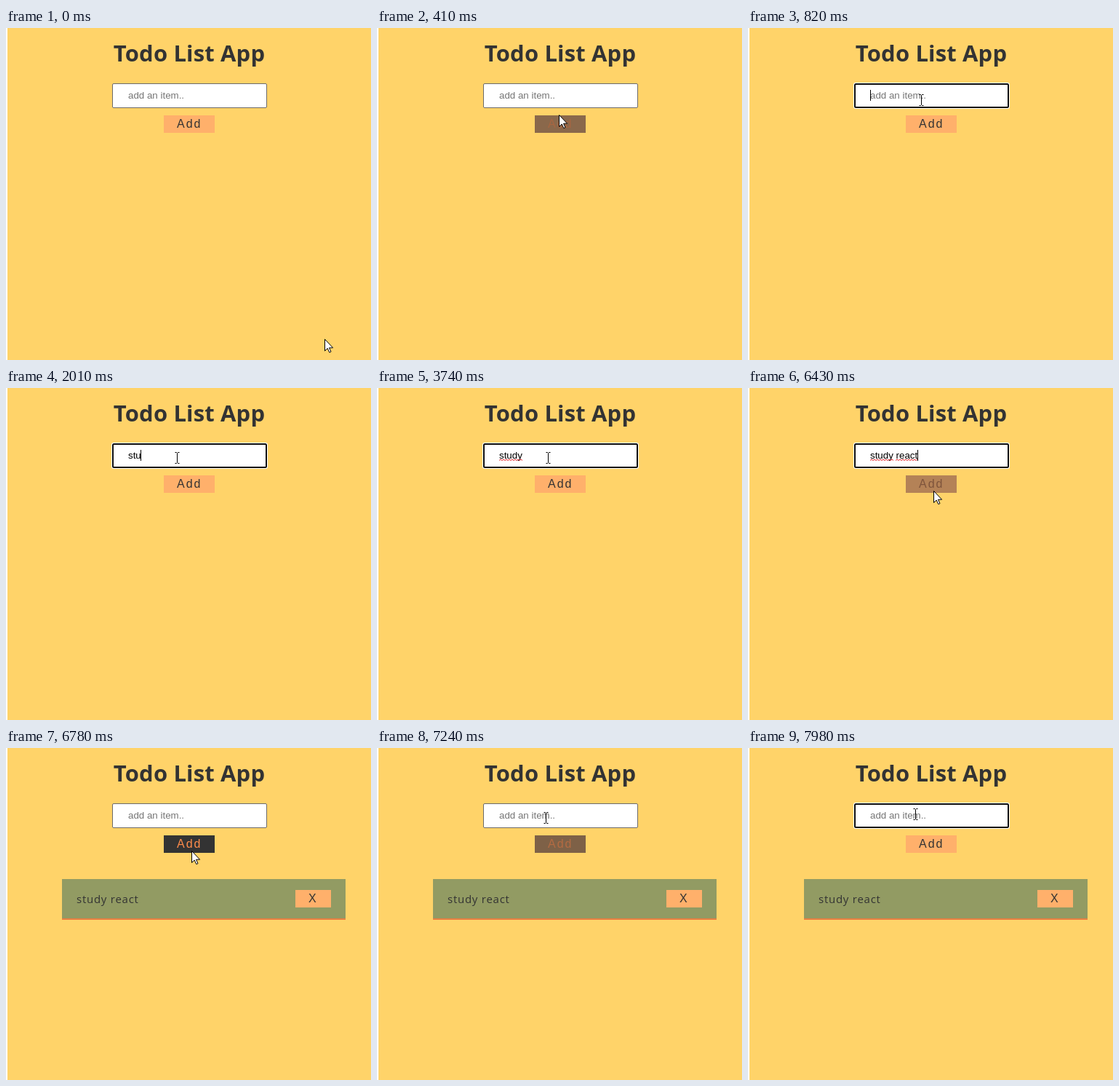
An HTML page that plays this animation: 502 px wide and 456 px high, repeating every 8 s.

```html
<!DOCTYPE html>
<html lang="en">
<head>
<meta charset="utf-8">
<title>Todo List App</title>
<style>
  html, body { margin: 0; width: 100%; height: 100%; overflow: hidden; background: #fff; }
  svg { display: block; }
  text { white-space: pre; }
  .ui { font-family: "Open Sans", "Noto Sans", sans-serif; fill: #333; }
  .field { font: 13.333px "Liberation Sans", Arial, sans-serif; }
  .btn { font: 16px "Liberation Sans", Arial, sans-serif; letter-spacing: 2px; fill: #333; }
</style>
</head>
<body>
<svg width="502" height="456" viewBox="0 0 502 456">
  <rect width="502" height="456" fill="#fff"/>
  <rect x="2" width="500" height="456" fill="#ffd369"/>
  <text class="ui" x="252" y="46" text-anchor="middle" font-size="31" font-weight="700" letter-spacing=".15">Todo List App</text>

  <rect id="idle" x="146.5" y="76.5" width="212" height="33" rx="1.5" fill="#fff" stroke="#6b6b6b"/>
  <g id="focus">
    <rect x="145" y="75" width="215" height="36" rx="3" fill="#fff"/>
    <rect x="147" y="77" width="211" height="32" rx="1.5" fill="#fff" stroke="#101010" stroke-width="2"/>
  </g>
  <text id="hint" class="field" x="168" y="97" fill="#757575">add an item..</text>
  <text id="typed" class="field" x="168" y="97" fill="#000"></text>
  <path id="wave1" fill="none" stroke="#e8262a"/>
  <path id="wave2" fill="none" stroke="#e8262a"/>
  <rect id="caret" y="85" width="1" height="15"/>

  <rect id="add" x="217" y="120" width="70" height="24"/>
  <text id="label" class="btn" x="235" y="137">Add</text>

  <g id="item">
    <rect x="77" y="180" width="390" height="56" fill="#929b63"/>
    <rect x="77" y="234" width="390" height="2" fill="#e97f42"/>
    <text class="ui" x="97" y="213" font-size="15" letter-spacing=".75">study react</text>
    <rect x="398" y="195" width="49" height="24" fill="#ffb06b"/>
    <text class="btn" x="416" y="212">X</text>
  </g>

  <path id="arrow" d="M.5 .5V16.5L4.2 13L6.8 18.6L9 17.6L6.5 12.2H11.6Z" fill="#fff" stroke="#000" stroke-linejoin="round"/>
  <path id="beam" d="M-3 -7.5H-1L0 -6.5L1 -7.5H3M0 -6.5V6.5M-3 7.5H-1L0 6.5L1 7.5H3" fill="none" stroke="#000"/>
</svg>
<script>
const LOOP = 8000;
const $ = id => document.getElementById(id);
const show = (id, on) => $(id).setAttribute("visibility", on ? "visible" : "hidden");
const within = (t, a, b) => t >= a && t < b;
const latest = (list, t) => list.filter(s => s[0] <= t).pop();

// time, x, y, shape
const pointer = [
  [0, 438, 427, "arrow"], [70, 420, 398, "arrow"], [140, 365, 315, "arrow"],
  [210, 318, 252, "arrow"], [270, 276, 195, "arrow"], [340, 255, 140, "arrow"],
  [410, 250, 119, "arrow"], [490, 246, 112, "arrow"], [560, 241.5, 103, "beam"],
  [630, 238.5, 99, "beam"], [890, 235.5, 96, "beam"],
  [6080, 236.5, 98, "beam"], [6150, 238.5, 101, "beam"], [6220, 241.5, 105, "beam"],
  [6290, 244, 113, "arrow"], [6360, 253, 136, "arrow"], [6430, 255, 141, "arrow"],
  [7040, 254, 137, "arrow"], [7110, 248, 125, "arrow"], [7180, 241, 112, "arrow"],
  [7240, 232.5, 96, "beam"], [7310, 230.5, 91, "beam"]
];

// time, text, caret x
const typing = [
  [0, "", 168], [1490, "s", 174], [1820, "st", 178], [2010, "stu", 185],
  [2280, "stud", 193], [2340, "studu", 200], [2740, "stud", 193],
  [2940, "study", 199], [3210, "study ", 203], [3810, "study r", 208],
  [4010, "study re", 215], [4360, "study rea", 222], [4890, "study reac", 229],
  [5290, "study react", 233], [6630, "", 168]
];

const caretOff = [[1350, 1490], [3740, 3810], [5750, 6290], [7980, LOOP]];

// enter, leave
const hovers = [[307, 490], [6370, 7180]];
const FADE = 300;

const ease = p => 1 - (1 - Math.min(1, Math.max(0, p))) ** 2;
const mix = (a, b, k) => `rgb(${a.map((v, i) => Math.round(v + (b[i] - v) * k))})`;

function hoverAt(t) {
  const span = hovers.find(([a, b]) => within(t, a, b + FADE));
  if (!span) return 0;
  const [a, b] = span;
  return t < b ? ease((t - a) / FADE) : ease((b - a) / FADE) * (1 - ease((t - b) / FADE));
}

function wave(x, end) {
  let d = `M${x} 99.5`;
  for (let up = true; x + 2 <= end; up = !up) d += `L${x += 2} ${up ? 98 : 99.5}`;
  return d;
}

function draw(t) {
  const [, x, y, shape] = latest(pointer, t);
  for (const id of ["arrow", "beam"]) show(id, id === shape);
  $(shape).setAttribute("transform", `translate(${x} ${y})`);

  const [, text, caretX] = latest(typing, t);
  const focused = within(t, 820, 6560) || t >= 7450;
  show("idle", !focused);
  show("focus", focused);
  show("hint", !text);
  $("typed").textContent = text;
  show("caret", focused && !caretOff.some(([a, b]) => within(t, a, b)));
  $("caret").setAttribute("x", caretX);
  show("wave1", within(t, 3210, 6630));
  show("wave2", within(t, 6290, 6630));

  const k = hoverAt(t);
  $("add").style.fill = mix([255, 176, 107], [51, 51, 51], k);
  $("label").style.fill = mix([51, 51, 51], [255, 140, 75], k);
  show("item", t >= 6630);
}

$("wave1").setAttribute("d", wave(168, 200));
$("wave2").setAttribute("d", wave(203, 233));

const start = performance.now();
function tick() {
  draw((performance.now() - start) % LOOP);
  requestAnimationFrame(tick);
}
tick();
</script>
</body>
</html>
```
